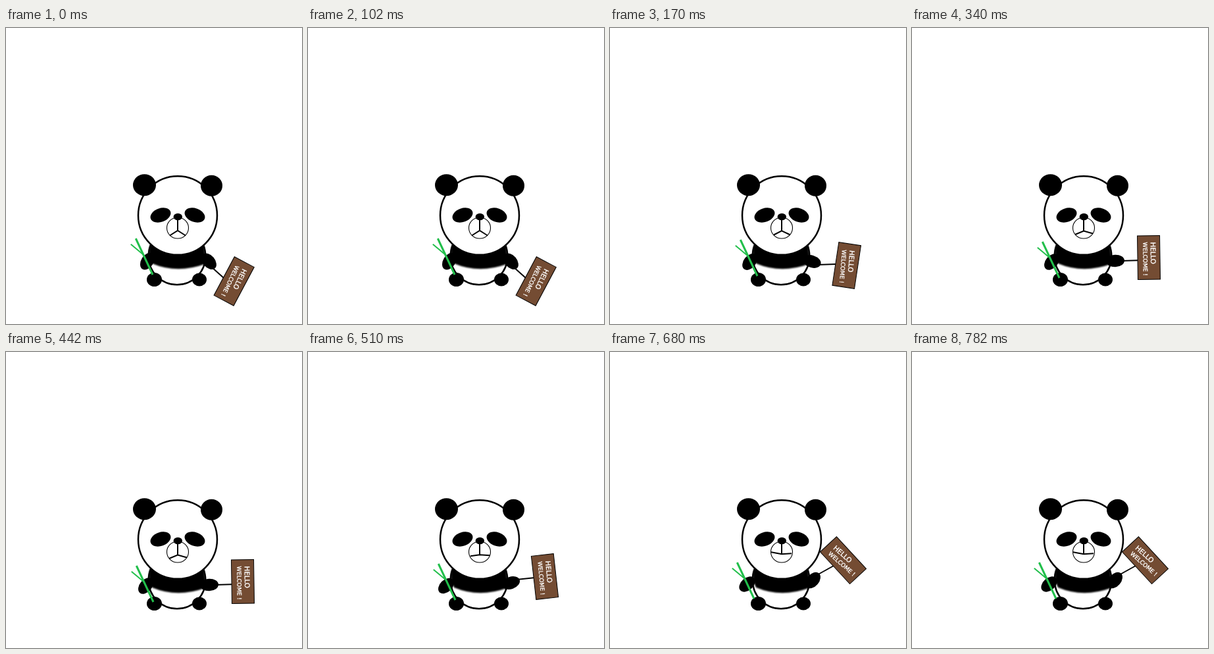
An HTML page with a canvas that plays this animation: 450 by 450 pixels, repeating every 850 ms.

```html
<!DOCTYPE html>
<html lang="en">
<head>
<meta charset="utf-8">
<title>Waving panda</title>
<style>
  html, body { margin: 0; width: 100%; height: 100%; overflow: hidden; background: #fff; }
  canvas { display: block; }
</style>
</head>
<body>
<canvas id="stage" width="450" height="450"></canvas>
<script>
const ctx = document.getElementById('stage').getContext('2d');
const STEP = 170;
const BAND = new Path2D('M219 329 Q214 345 222 358 Q260 374 302 359 L303 345 L301 329 Z');

// arms: x, y, degrees; bamboo: offset; mouth and stick: points; sign: x, y, degrees, lettering tilt
const poses = [
  { left: [214.8, 354.7, -58], right: [308.4, 354.8, 50], bamboo: [0, 0], mouth: [249, 315.5, 261, 308, 273, 315.5],
    stick: [312, 363, 331, 380], sign: [346.7, 385, 118, -2] },
  { left: [212.5, 355.5, -52], right: [307, 355, 18], bamboo: [1, 2], mouth: [249, 314.5, 261, 308.3, 274, 314.5],
    stick: [315, 360, 343, 359], sign: [359.7, 361, 98.6, -4] },
  { left: [212.5, 355.5, -50], right: [309, 354, -2], bamboo: [1, 5], mouth: [248, 314, 261, 308.5, 275, 312.5],
    stick: [318, 354, 343, 353.3], sign: [360, 349, 89.2, 0] },
  { left: [210, 355.5, -44], right: [308.5, 351, -20], bamboo: [1, 2], mouth: [247, 310.3, 261, 308.3, 276, 309.3],
    stick: [317, 346, 343, 343.3], sign: [360, 341.5, 83.6, 1.5] },
  { left: [208.5, 353, -42], right: [308.5, 347, -50], bamboo: [-4, 0], mouth: [245, 304.3, 261, 307.3, 276, 306.3],
    stick: [313, 340, 340, 325], sign: [354.5, 316.7, 47.2, -6] }
];

const rad = degrees => degrees * Math.PI / 180;

function oval(x, y, rx, ry = rx, angle = 0, fill = '#000', line = 0) {
  ctx.beginPath();
  ctx.ellipse(x, y, rx, ry, rad(angle), 0, 2 * Math.PI);
  ctx.fillStyle = fill;
  ctx.fill();
  if (line) {
    ctx.strokeStyle = '#000';
    ctx.lineWidth = line;
    ctx.stroke();
  }
}

function polyline(points, width, color = '#000') {
  ctx.beginPath();
  for (let i = 0; i < points.length; i += 2) ctx.lineTo(points[i], points[i + 1]);
  ctx.strokeStyle = color;
  ctx.lineWidth = width;
  ctx.stroke();
}

function drawBody() {
  oval(260, 347, 43.3, 43.3, 0, '#fff', 2.5);
  ctx.save();
  ctx.filter = 'blur(1.2px)';
  ctx.fillStyle = '#000';
  ctx.fill(BAND);
  ctx.restore();
}

function drawHead(mouth) {
  oval(261, 285, 60, 59.8, 0, '#fff', 2.5);
  oval(210.5, 238.7, 17.5, 16.5);
  oval(312.5, 239.7, 16.5, 16);
  oval(235, 284.5, 16, 10.3, -20);
  oval(287, 284.5, 16, 10.3, 20);
  oval(261, 304, 16.5, 16, 0, '#fff', 1.1);
  oval(261.3, 287, 6.7, 5.2);
  polyline([261, 290, 261, mouth[3]], 2);
  polyline(mouth, 2);
}

function drawBamboo([x, y]) {
  ctx.save();
  ctx.translate(x, y);
  polyline([197.3, 320, 223, 375], 3, '#22bf4b');
  polyline([189.8, 328.8, 209.5, 345.3], 2, '#22bf4b');
  ctx.restore();
}

function letter(text, size, x, y) {
  ctx.font = `${size}px "DejaVu Sans", sans-serif`;
  ctx.fillText(text, x, y);
  ctx.strokeText(text, x, y);
}

function drawSign([x, y, angle, tilt]) {
  ctx.save();
  ctx.translate(x, y);
  ctx.rotate(rad(angle));
  ctx.fillStyle = '#744c33';
  ctx.fillRect(-33.2, -17, 66.4, 34);
  ctx.strokeStyle = '#000';
  ctx.lineWidth = 1;
  ctx.strokeRect(-33.2, -17, 66.4, 34);
  ctx.rotate(rad(tilt));
  ctx.fillStyle = ctx.strokeStyle = '#fff';
  ctx.lineWidth = 0.35;
  letter('HELLO', 10.3, -23.5, -3);
  letter('WELCOME !', 8.7, -23.5, 8.5);
  ctx.restore();
}

function draw(now) {
  const pose = poses[Math.floor(now / STEP) % poses.length];
  ctx.fillStyle = '#fff';
  ctx.fillRect(0, 0, 450, 450);
  drawBody();
  polyline(pose.stick, 2);
  for (const [x, y, angle] of [pose.left, pose.right]) oval(x, y, 14, 9.3, angle);
  drawHead(pose.mouth);
  oval(225.5, 382.5, 11.5, 10.5);
  oval(294, 382.5, 11, 10);
  drawBamboo(pose.bamboo);
  drawSign(pose.sign);
}

const start = performance.now();
function tick() {
  draw(performance.now() - start);
  requestAnimationFrame(tick);
}
tick();
</script>
</body>
</html>
```
